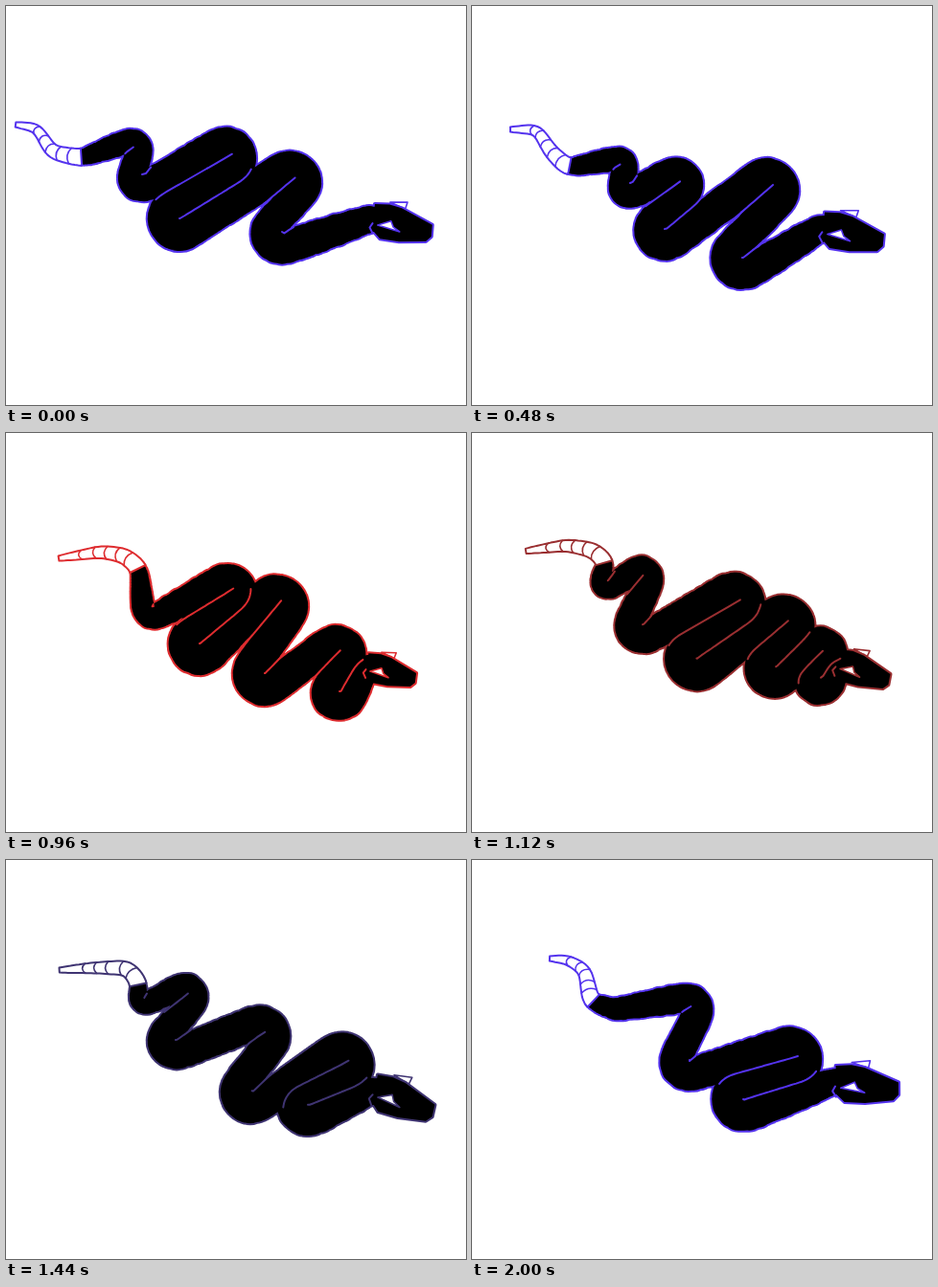
Recreate the animation shown at these times as an HTML page. Size 480 by 417 pixels, loop 2120 ms.

```html
<!DOCTYPE html>
<html lang="en">
<head>
<meta charset="utf-8">
<title>Snake</title>
<style>
  html, body { margin: 0; width: 100%; height: 100%; overflow: hidden; background: #fff; }
  svg { display: block; width: 100%; height: 100%; }
  path { fill: none; stroke-width: 2; stroke-linejoin: round; stroke-linecap: round; }
  #rim { stroke-width: 4; }
  #body { fill: #000; stroke: none; }
  #tail, #eye, #horn { fill: #fff; }
  #eye, #horn, #rings { stroke-width: 1.6; }
</style>
</head>
<body>
<svg viewBox="0 0 480 417">
  <path id="horn"/><path id="rim"/><path id="body"/><path id="folds"/>
  <path id="tail"/><path id="rings"/><path id="eye"/><path id="cheek"/>
</svg>
<script>
const LOOP = 2120, TICK = 40, DRAWING = 62.5, DELAY = 22;
const STEP = 3;   // distance between samples of the spine
const BLUE = [84, 51, 238], RED = [222, 44, 47], DARK = [52, 52, 52];

const points = text => text.split(' ').map(p => p.split(',').map(Number));
const lerp = (a, b, t) => a + (b - a) * t;
const mix = (a, b, t) => a.map((v, i) => Array.isArray(v) ? mix(v, b[i], t) : lerp(v, b[i], t));
const gap = (a, b) => Math.hypot(b[0] - a[0], b[1] - a[1]);
const heading = (a, b) => Math.atan2(b[1] - a[1], b[0] - a[0]);
const polar = (p, angle, r) => [p[0] + r * Math.cos(angle), p[1] + r * Math.sin(angle)];
const xy = p => p[0].toFixed(1) + ' ' + p[1].toFixed(1);
const line = pts => 'M' + pts.map(xy).join('L');

// Head in units of the neck-to-nose length
const HEAD = points('-.04,-.22 .2,-.27 .41,-.26 .97,-.11 1,.08 .93,.18 .5,.29 .18,.32 .04,.22');
const EYE = points('.09,.11 .29,-.01 .35,.08 .47,.13');
const HORN = points('.2,-.31 .48,-.38 .47,-.26');
const CHEEK = points('0,.1 -.03,.18 .04,.26');

// The body bends round pins. Pins are numbered downwards from tail to head and
// keep their number as they travel: odd ones are crests, even ones are troughs.
function pose(drawing, ink, tail, first, pins, head) {
  const [neck, nose] = points(head);
  tail = points(tail);
  return { drawing, ink, tail, first, pins: points(pins), neck, nose, base: tail[3] };
}
const poses = [
  pose(0, BLUE, '10,124 32,127 48,153 79,159', 5,
    '130,153 142,176 229,159 181,222 296,186 288,236', '384,221 445,236'),
  pose(2, BLUE, '36,133 62,131 76,150 88,171', 5,
    '168,159 171,185 265,175 219,238 330,207 312,255', '386,227 439,242'),
  pose(7, BLUE, '40,129 68,129 82,152 100,169', 9,
    '152,171 165,185 211,188 201,233 308,193 282,263', '367,230 430,246'),
  pose(15, RED, '55,131 100,124 124,128 139,141', 12,
    '154,181 231,167 202,220 282,182 270,251 344,234 348,270', '377,242 428,257'),
  pose(20, DARK, '58,112 98,107 131,114 143,128', 14,
    '146,174 227,172 214,229 336,197 283,259', '388,234 448,261'),
  pose(26, BLUE, '51,121 78,124 120,110 132,131', 16,
    '147,176 269,175 239,216 338,212 342,266', '379,249 444,268'),
  pose(31, BLUE, '81,103 100,104 118,115 124,148', 18,
    '150,146 223,158 227,209 332,208 283,250', '380,230 446,240')
];

const lowest = p => p.first - p.pins.length + 1;
const pinAt = (p, id) => p.first < id ? p.base : p.pins[p.first - id] || p.neck;

function blend(a, b, t) {
  const between = key => mix(a[key], b[key], t), pins = [];
  for (let id = Math.max(a.first, b.first); id >= Math.min(lowest(a), lowest(b)); id--)
    pins.push({ at: mix(pinAt(a, id), pinAt(b, id), t), side: id % 2 ? 1 : -1 });
  return { pins, ink: between('ink'), tail: between('tail'), neck: between('neck'), nose: between('nose') };
}

// Half the thickness, from the distances to the rattle and to the head
const girth = (fromTail, toHead) =>
  (8 + 9.5 * (1 - Math.exp(-fromTail / 80))) * (1 - .4 * Math.exp(-toHead / 40));

const travelled = pts => pts.reduce((sum, p, i) => [...sum, i ? sum[i - 1] + gap(pts[i - 1], p) : 0], []);

function resample(pts) {
  const dist = travelled(pts), total = dist[dist.length - 1], count = Math.round(total / STEP);
  let i = 1;
  return Array.from({ length: count + 1 }, (_, k) => {
    const want = total * k / count;
    while (i < pts.length - 1 && dist[i] < want) i++;
    return mix(pts[i - 1], pts[i], (want - dist[i - 1]) / (dist[i] - dist[i - 1] || 1));
  });
}

function smooth(pts, passes) {
  for (; passes > 0; passes--)
    pts = pts.map((p, i) => i && i < pts.length - 1
      ? [0, 1].map(k => (pts[i - 1][k] + p[k] + pts[i + 1][k]) / 3) : p);
  return pts;
}

// Spine: tail, then an arc round each pin joined by straight limbs, then the neck
function buildSpine({ tail, pins, neck, nose }) {
  const chain = [tail[3], ...pins.map(p => p.at), neck];
  const dist = travelled(chain), total = dist[dist.length - 1];
  const path = [...tail], bends = [];
  pins.forEach(({ at, side }, i) => {
    const before = chain[i], after = chain[i + 2];
    const room = Math.min(gap(before, at), gap(at, after));
    const r = girth(dist[i + 1], total - dist[i + 1]) * Math.min(1, room / 20);
    const start = heading(before, at) - side * Math.PI / 2;
    let turn = side * (heading(at, after) - heading(before, at));
    while (turn < -Math.PI / 2) turn += 2 * Math.PI;
    while (turn >= Math.PI * 1.5) turn -= 2 * Math.PI;
    const arc = u => polar(at, start + side * turn * u, r);
    for (let u = 0; u <= 1; u += .125) path.push(arc(u));
    bends.push({ at, side, apex: arc(.5) });
  });
  path.push(neck, mix(neck, nose, .25));
  const spine = smooth(resample(path), 6);
  const base = Math.round(travelled(tail)[3] / STEP);
  return { spine, bends, base };
}

// Where the two limbs of a bend touch, the crease runs midway between them
function crease(spine, radius, { at, side, apex }) {
  let mid = 0;
  spine.forEach((p, i) => { if (gap(p, apex) < gap(spine[mid], apex)) mid = i; });
  const r = radius(mid), pts = [mix(at, apex, side > 0 ? .5 : 0)];
  for (let d = Math.round(1.5 * r / STEP); spine[mid - d] && spine[mid + d]; d++) {
    const a = spine[mid - d], b = spine[mid + d];
    if (gap(a, b) > radius(mid - d) + radius(mid + d) + 5) break;
    pts.push(mix(a, b, .5));
  }
  return pts.length > 2 ? line(pts) : '';
}

const disc = ([x, y], r) => {
  const d = (2 * r).toFixed(1);
  return `M${xy([x - r, y])}a${r.toFixed(2)} ${r.toFixed(2)} 0 1 1 ${d} 0a${r.toFixed(2)} ${r.toFixed(2)} 0 1 1 -${d} 0z`;
};

const part = {};
document.querySelectorAll('path').forEach(p => part[p.id] = p);
const set = (id, d) => part[id].setAttribute('d', d);

function drawTail(spine, base) {
  const side = (i, sign) => {
    const angle = heading(spine[Math.max(0, i - 1)], spine[i + 1]);
    return polar(spine[i], angle + sign * Math.PI / 2, 2.5 + 6.5 * (i / base) ** .8);
  };
  const along = Array.from({ length: base + 1 }, (_, i) => i);
  const left = along.map(i => side(i, -1)), right = along.map(i => side(i, 1));
  set('tail', line([...left.reverse(), ...right]) + 'Z');
  set('rings', [.28, .42, .56, .7, .84].map(u => {
    const i = Math.round(u * base), back = spine[Math.max(0, i - 2)];
    return `M${xy(side(i, -1))}Q${xy(back)} ${xy(side(i, 1))}`;
  }).join(''));
}

function draw(now) {
  const tick = Math.floor(now % LOOP / TICK) * TICK;
  const drawing = Math.max(0, Math.floor((tick - DELAY) / DRAWING));
  let i = 0;
  while (i < poses.length - 2 && poses[i + 1].drawing <= drawing) i++;
  const a = poses[i], b = poses[i + 1];
  const snake = blend(a, b, (drawing - a.drawing) / (b.drawing - a.drawing));
  const { spine, bends, base } = buildSpine(snake);
  const radius = k => girth(Math.max(0, k - base) * STEP, (spine.length - 1 - k) * STEP);

  const { neck, nose } = snake, dx = nose[0] - neck[0], dy = nose[1] - neck[1];
  const place = shape => line(shape.map(([x, y]) => [neck[0] + x * dx - y * dy, neck[1] + x * dy + y * dx]));

  const outline = spine.map((p, k) => k < base ? '' : disc(p, radius(k))).join('') + place(HEAD) + 'Z';
  set('rim', outline);
  set('body', outline);
  set('folds', bends.map(bend => crease(spine, radius, bend)).join(''));
  drawTail(spine, base);
  set('eye', place(EYE) + 'Z');
  set('horn', place(HORN) + 'Z');
  set('cheek', place(CHEEK));

  const ink = `rgb(${snake.ink.map(Math.round)})`;
  for (const id in part) if (id !== 'body') part[id].style.stroke = ink;
}

const began = performance.now();
function frame() {
  draw(performance.now() - began);
  requestAnimationFrame(frame);
}
frame();
</script>
</body>
</html>
```
